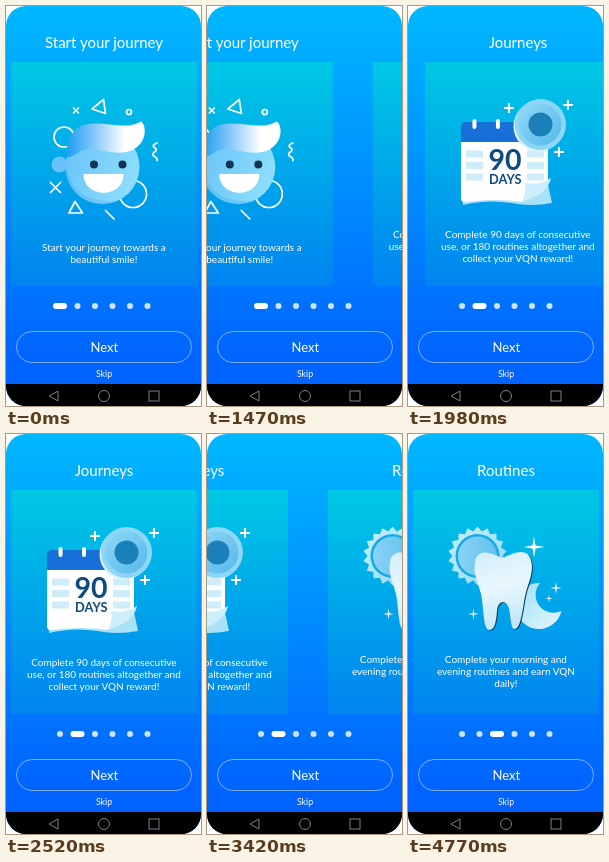
These frames come from a looping animation (195x400 px, 4.8 s). An HTML page:

```html
<!DOCTYPE html>
<html lang="en">
<head>
<meta charset="utf-8">
<title>Onboarding</title>
<style>
  html, body { margin: 0; width: 100%; height: 100%; overflow: hidden; background: #fff; }
  svg { display: block; width: 100vw; height: 100vh; }
  text { font-family: Lato, sans-serif; fill: #fff; text-anchor: middle; }
  .title { font-size: 15px; }
  .body { font-size: 10px; }
  .line { fill: none; stroke: #fff; stroke-width: 1.7; stroke-linecap: round; stroke-linejoin: round; }
  .plus { fill: none; stroke: #fff; stroke-width: 2; }
  .bold { font-weight: 700; fill: #0d4a7d; }
</style>
</head>
<body>
<svg viewBox="0 0 195 400">
  <defs>
    <linearGradient id="bg" x2="0" y2="1">
      <stop stop-color="#00b8ff"/><stop offset=".88" stop-color="#0064ff"/><stop offset="1" stop-color="#0060ff"/>
    </linearGradient>
    <linearGradient id="card" x2="0" y2="1">
      <stop stop-color="#00c8e4"/><stop offset="1" stop-color="#0084f0"/>
    </linearGradient>
    <linearGradient id="skin" x2="1" y2=".3">
      <stop stop-color="#68c3fa"/><stop offset="1" stop-color="#8bdcfd"/>
    </linearGradient>
    <linearGradient id="hair">
      <stop stop-color="#1b9ff3"/><stop offset=".25" stop-color="#62b9f7"/><stop offset=".75" stop-color="#fff"/>
    </linearGradient>
    <linearGradient id="coin" x2="1" y2="1">
      <stop stop-color="#8fd8f7"/><stop offset="1" stop-color="#56b8ea"/>
    </linearGradient>
    <linearGradient id="pale" x2="1" y2="1">
      <stop stop-color="#c9effb"/><stop offset="1" stop-color="#8fd6f5"/>
    </linearGradient>
    <linearGradient id="disc">
      <stop stop-color="#8ad3f5"/><stop offset="1" stop-color="#62c1ef"/>
    </linearGradient>
    <linearGradient id="moon" x2="1" y2="1">
      <stop stop-color="#9fe0f7"/><stop offset="1" stop-color="#e2f6fd"/>
    </linearGradient>
    <linearGradient id="enamel" x2=".2" y2="1">
      <stop stop-color="#d3eefa"/><stop offset=".5" stop-color="#e9f7fd"/><stop offset="1" stop-color="#c3e8f7"/>
    </linearGradient>
    <clipPath id="screen"><rect width="195" height="400" rx="20"/></clipPath>
    <clipPath id="head"><circle cx="96.5" cy="161" r="37"/></clipPath>
    <path id="tooth" d="M94 124C102 121 114 114 120.500 121C127 130 123 143 119.500 153C115 165 115 187 109 194C103 199 103 186 101.500 177C99.500 165 90 165 89 177C88 188 87 196 81 196C75 195 76 175 73 160C70 148 65 140 67 128C69 114 83 118 94 124z"/>
  </defs>

  <g clip-path="url(#screen)">
    <rect width="195" height="400" fill="url(#bg)"/>

    <g class="page">
      <g class="line">
        <path d="M67.5 102l5 5m0-5l-5 5M86 103L97.500 93.500L99.500 107.500zM44.500 176.500l10 10m0-10l-10 10M69 195.500L63 207H76.500zM99.500 204.500L108 213"/>
        <circle cx="123" cy="106" r="2.500"/>
        <circle cx="58" cy="131" r="10"/>
        <circle cx="127" cy="188" r="13.500"/>
        <path d="M151 137q-6 2.500-2.500 4.500t0 4.500t0 4.500t2.500 4"/>
      </g>
      <circle cx="53.500" cy="158.500" r="8" fill="#69c2fa"/>
      <circle cx="96.500" cy="161" r="37" fill="url(#skin)"/>
      <path clip-path="url(#head)" d="M59 145C60 185 80 197 112 195L96 205L55 190z" fill="#48acf4" opacity=".35"/>
      <path d="M60 151C61 133 66 119 86 117.500C103 116.500 121 124 135 115.500C142 120 141 144 117 146.500C100 148 86 139 75 145C70 148 66 152 60 151z" fill="url(#hair)"/>
      <circle cx="88" cy="158.500" r="4" fill="#123454"/>
      <circle cx="116.500" cy="158.500" r="4" fill="#123454"/>
      <path d="M77.500 168H117.500C117.500 193 77.500 193 77.500 168z" fill="#fff"/>
    </g>

    <g class="page">
      <path d="M43 190L128 178L132 197Q110 201 92 197Q66 193 43 199z" fill="#a9e2f7"/>
      <rect x="41" y="116" width="87" height="30" rx="5" fill="#176fd8"/>
      <path d="M41 136H128V175L102 196Q75 192 46 196Q41 197 41 192z" fill="#fff"/>
      <path d="M102 196Q107 186 105 177Q119 180 131 172Q128 188 102 196z" fill="#cdeefa"/>
      <g id="cells" fill="#cfecfa"></g>
      <g id="rings" fill="#fff"></g>
      <text class="bold" x="85" y="164" font-size="28.500">90</text>
      <text class="bold" x="85.300" y="178.300" font-size="12.800">DAYS</text>
      <circle cx="118.500" cy="120.500" r="25" fill="#d9f4fd"/>
      <circle cx="120.500" cy="118.500" r="25.500" fill="#8ed6f5"/>
      <circle cx="120.500" cy="118.500" r="21" fill="url(#coin)"/>
      <circle cx="120.500" cy="118.500" r="12" fill="#1b80b8"/>
      <path class="plus" d="M89 97v10m-5-5h10M148 94v10m-5-5h10M139 141v10m-5-5h10"/>
    </g>

    <g class="page">
      <path id="sun" fill="url(#pale)"/>
      <circle cx="69.500" cy="122" r="22" fill="#16abe7"/>
      <circle cx="69.500" cy="122" r="19.500" fill="url(#disc)"/>
      <path d="M132 149A23 23 0 1 0 153.400 177A18 18 0 0 1 132 149z" fill="url(#moon)"/>
      <g id="stars" fill="#fff"></g>
      <use href="#tooth" x="1" y=".8" fill="#0c3f66"/>
      <use href="#tooth" fill="url(#enamel)"/>
    </g>

    <g id="dots" fill="#fff"></g>
    <rect x="10.500" y="325.500" width="175" height="31" rx="15.500" fill="none" stroke="#fff" stroke-opacity=".6" stroke-width=".8"/>
    <text x="98.400" y="345.800" font-size="13">Next</text>
    <text x="98" y="371" font-size="8.800">Skip</text>

    <rect y="378" width="195" height="22"/>
    <g fill="none" stroke="#74838c">
      <path d="M52 385V395L43 390z"/>
      <circle cx="98" cy="390" r="5.500"/>
      <rect x="143" y="385" width="10" height="10"/>
    </g>
  </g>
</svg>
<script>
  const LOOP = 4800, PITCH = 226;
  const COPY = [
    { title: 'Start your journey', y: 244.5,
      lines: ['Start your journey towards a', 'beautiful smile!'] },
    { title: 'Journeys', y: 232,
      lines: ['Complete 90 days of consecutive', 'use, or 180 routines altogether and', 'collect your VQN reward!'] },
    { title: 'Routines', y: 228.5,
      lines: ['Complete your morning and', 'evening routines and earn VQN', 'daily!'] }
  ];
  // Time in ms, scroll in px
  const SWIPES = [
    [1020, 0], [1470, 65], [1980, 214], [2430, 226],
    [2700, 226], [3120, 257], [3780, 429.5], [4240, 452]
  ];

  const $ = id => document.getElementById(id);
  const pages = [...document.querySelectorAll('.page')];

  function add(parent, tag, attrs, text = '') {
    const el = document.createElementNS('http://www.w3.org/2000/svg', tag);
    for (const key in attrs) el.setAttribute(key, attrs[key]);
    el.textContent = text;
    parent.append(el);
    return el;
  }

  function spikes(cx, cy, n, outer, inner) {
    let d = '';
    for (let i = 0; i < 2 * n; i++) {
      const r = i % 2 ? inner : outer, a = i * Math.PI / n - Math.PI / 2;
      d += (i ? 'L' : 'M') + (cx + r * Math.cos(a)).toFixed(2) + ' ' + (cy + r * Math.sin(a)).toFixed(2);
    }
    return d + 'z';
  }

  COPY.forEach((copy, i) => {
    const page = pages[i];
    page.prepend(add(page, 'rect', { x: 5, y: 56, width: 186, height: 224, fill: 'url(#card)' }));
    add(page, 'text', { class: 'title', x: 98, y: 41.5 }, copy.title);
    copy.lines.forEach((line, n) =>
      add(page, 'text', { class: 'body', x: 97.9, y: copy.y + 12.2 * n }, line));
  });

  for (const x of [54.5, 78])
    add($('rings'), 'rect', { x: x - 2, y: 113, width: 4, height: 10, rx: 2 });
  for (const x of [46, 107])
    for (const y of [144.5, 156, 167.5])
      add($('cells'), 'rect', { x, y, width: 17, height: 7 });
  for (const [x, y, r] of [[126, 113, 10.5], [148, 154, 6], [141, 164.5, 4], [65.5, 180, 5.5]])
    add($('stars'), 'path', { d: spikes(x, y, 4, r, r * 0.2) });
  $('sun').setAttribute('d', spikes(69.5, 122, 18, 29.5, 25));

  const dots = [0, 1, 2, 3, 4, 5].map(() => add($('dots'), 'rect', { y: 297, height: 6, rx: 3 }));

  const secant = i => {
    const a = SWIPES[i], b = SWIPES[i + 1];
    return a && b ? (b[1] - a[1]) / (b[0] - a[0]) : 0;
  };
  const slope = i => {
    const a = secant(i - 1), b = secant(i);
    return a * b > 0 ? 2 * a * b / (a + b) : 0;
  };

  // Monotone cubic through the swipe points
  function scrollAt(t) {
    const last = SWIPES.length - 1;
    if (t <= SWIPES[0][0]) return SWIPES[0][1];
    if (t >= SWIPES[last][0]) return SWIPES[last][1];
    const i = SWIPES.findIndex(p => p[0] > t) - 1;
    const [t0, x0] = SWIPES[i], [t1, x1] = SWIPES[i + 1];
    const h = t1 - t0, u = (t - t0) / h, v = 1 - u;
    return x0 * (1 + 2 * u) * v * v + x1 * u * u * (3 - 2 * u)
      + h * u * v * (slope(i) * v - slope(i + 1) * u);
  }

  function render(t) {
    const x = scrollAt(t), active = Math.round(x / PITCH);
    pages.forEach((page, i) =>
      page.setAttribute('transform', `translate(${(i * PITCH - x).toFixed(2)} 0)`));
    dots.forEach((dot, i) => {
      const w = i === active ? 14 : 6;
      dot.setAttribute('x', 54 + 17.5 * i - w / 2);
      dot.setAttribute('width', w);
      dot.setAttribute('opacity', i === active ? 1 : 0.8);
    });
  }

  const start = performance.now();
  function tick() {
    render((performance.now() - start) % LOOP);
    requestAnimationFrame(tick);
  }
  tick();
</script>
</body>
</html>
```
